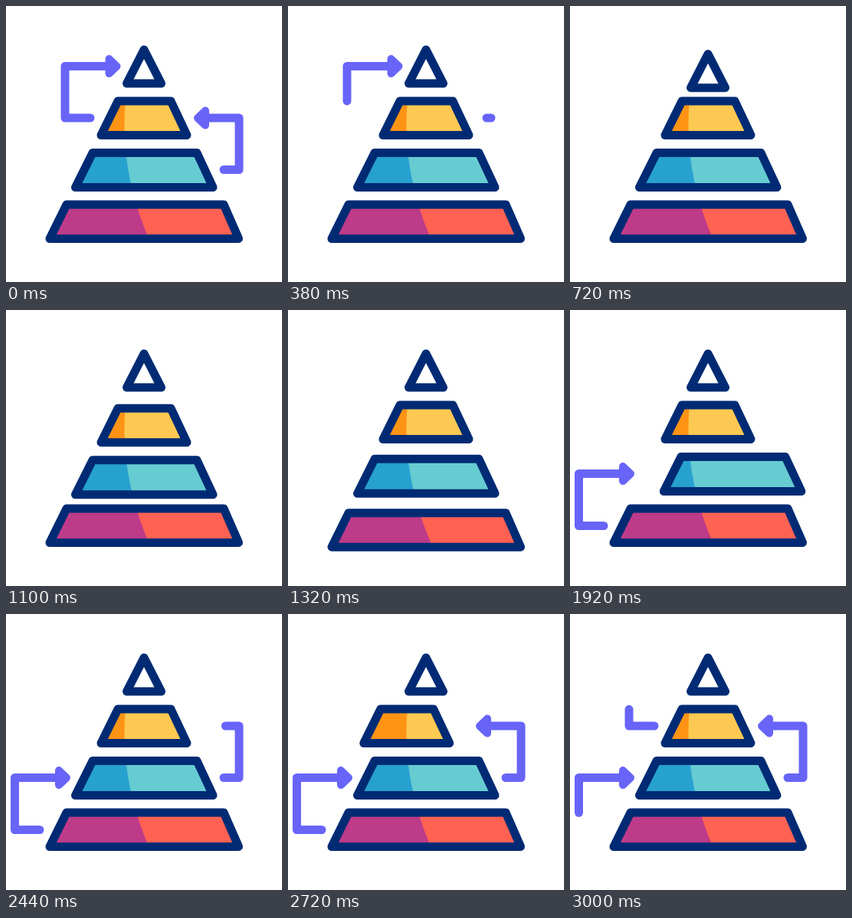
Recreate the animation shown at these times as an HTML page with a canvas. Size 360 by 360 pixels, loop 3020 ms.

```html
<!DOCTYPE html>
<html lang="en">
<head>
<meta charset="utf-8">
<title>Pyramid</title>
<style>
html, body { margin: 0; width: 100%; height: 100%; overflow: hidden; background: #fff; }
canvas { display: block; width: 360px; height: 360px; }
</style>
</head>
<body>
<canvas id="stage"></canvas>
<script>
const LOOP = 3020, SIZE = 360;
const NAVY = '#002b74', PURPLE = '#6864f8', TEAL = '#5db0bf';
const canvas = document.getElementById('stage');
const ctx = canvas.getContext('2d');
const ratio = window.devicePixelRatio || 1;
canvas.width = canvas.height = SIZE * ratio;

// Corners: top left, top right, bottom right, bottom left
const layers = [
  { pts: [[180, 57], [202.5, 101], [157.5, 101]], fill: ['#fff', '#fff'] },
  { pts: [[146, 124], [215, 124], [236, 168.5], [124, 168.5]], fill: ['#ff9414', '#fec952'], push: 2660, dx: -32 },
  { pts: [[113, 191.5], [249, 191.5], [270, 236.5], [90.5, 236.5]], fill: ['#27a1cf', '#67ccd2'], push: 1930, dx: 32 },
  { pts: [[79, 259], [284, 259], [303.5, 303.5], [57, 303.5]], fill: ['#bd3b88', '#ff6153'] }
];

const DRAW = 378;
const lowerLeft = { pts: [[44, 281.5], [11.5, 281.5], [11.5, 213.5], [70, 213.5]], dir: 1 };
const right = { pts: [[284, 213.5], [304, 213.5], [304, 146], [259, 146]], dir: -1 };
const upperLeft = { pts: [[110, 146], [77, 146], [77, 78.5], [135.5, 78.5]], dir: 1 };

const clamp = v => Math.max(0, Math.min(1, v));
const progress = (t, start, dur) => clamp((t - start) / dur);

function bump(t, mid, half) {
  const u = (t - mid) / half;
  return Math.abs(u) < 1 ? Math.cos(u * Math.PI / 2) ** 2 : 0;
}

function trace(pts) {
  ctx.beginPath();
  pts.forEach(p => ctx.lineTo(p[0], p[1]));
}

// The shaded side of the pyramid ends at one long curve
function shadePath() {
  ctx.beginPath();
  ctx.moveTo(0, 100);
  for (let y = 100; y <= 330; y += 5) ctx.lineTo(154.5 + 0.00144 * (y - 155) ** 2, y);
  ctx.lineTo(0, 330);
  ctx.closePath();
}

function drawLayer(layer, i, t) {
  const dx = layer.push ? layer.dx * bump(t, layer.push, 200) : 0;
  const dy = 8.5 * bump(t, 800 + 200 * i, 200);
  const pts = layer.pts.map(([x, y]) => [x + dx, y + dy]);
  ctx.save();
  trace(pts);
  ctx.closePath();
  ctx.clip();
  ctx.fillStyle = layer.fill[1];
  ctx.fillRect(0, 0, SIZE, SIZE);
  ctx.fillStyle = layer.fill[0];
  shadePath();
  ctx.fill();
  ctx.restore();
  trace(pts);
  ctx.closePath();
  ctx.lineWidth = 11;
  ctx.strokeStyle = NAVY;
  ctx.stroke();
}

// Part of a polyline between two distances along it
function slice(pts, from, to) {
  const out = [];
  let at = 0;
  for (let i = 1; i < pts.length; i++) {
    const [a, b] = [pts[i - 1], pts[i]];
    const len = Math.hypot(b[0] - a[0], b[1] - a[1]);
    const s = Math.max(from, at), e = Math.min(to, at + len);
    if (e > s) {
      for (const d of [s, e]) {
        const k = (d - at) / len;
        out.push([a[0] + (b[0] - a[0]) * k, a[1] + (b[1] - a[1]) * k]);
      }
    }
    at += len;
  }
  return out;
}

function pathLength(pts) {
  return pts.slice(1).reduce((sum, p, i) => sum + Math.hypot(p[0] - pts[i][0], p[1] - pts[i][1]), 0);
}

function drawArrow(arrow, drawn, erased, color) {
  if (drawn <= 0 || erased >= 1) return;
  const total = pathLength(arrow.pts);
  ctx.strokeStyle = ctx.fillStyle = color;
  ctx.lineWidth = 11;
  trace(slice(arrow.pts, erased * total, drawn * total));
  ctx.stroke();

  const scale = Math.min(clamp((drawn - 0.8) / 0.2), clamp((1 - erased) / 0.2));
  if (scale <= 0) return;
  const [x, y] = arrow.pts[3];
  ctx.save();
  ctx.translate(x, y);
  ctx.scale(scale * arrow.dir, scale);
  trace([[-1, -9.5], [9, 0], [-1, 9.5]]);
  ctx.closePath();
  ctx.lineWidth = 10;
  ctx.fill();
  ctx.stroke();
  ctx.restore();
}

function render(t) {
  ctx.setTransform(ratio, 0, 0, ratio, 0, 0);
  ctx.fillStyle = '#fff';
  ctx.fillRect(0, 0, SIZE, SIZE);
  ctx.lineCap = ctx.lineJoin = 'round';

  layers.forEach((layer, i) => drawLayer(layer, i, t));

  drawArrow(lowerLeft, progress(t, 1411, DRAW), progress(t, 2871, DRAW), t < 1620 ? TEAL : PURPLE);
  if (t < 1000) {
    drawArrow(right, 1, progress(t, 20, DRAW), PURPLE);
    drawArrow(upperLeft, 1, progress(t, 250, DRAW), PURPLE);
  } else {
    drawArrow(right, progress(t, 2141, DRAW), 0, PURPLE);
    drawArrow(upperLeft, progress(t, 2871, DRAW), 0, PURPLE);
  }
}

const begin = performance.now();
function tick() {
  render((performance.now() - begin) % LOOP);
  requestAnimationFrame(tick);
}
render(0);
requestAnimationFrame(tick);
</script>
</body>
</html>
```
